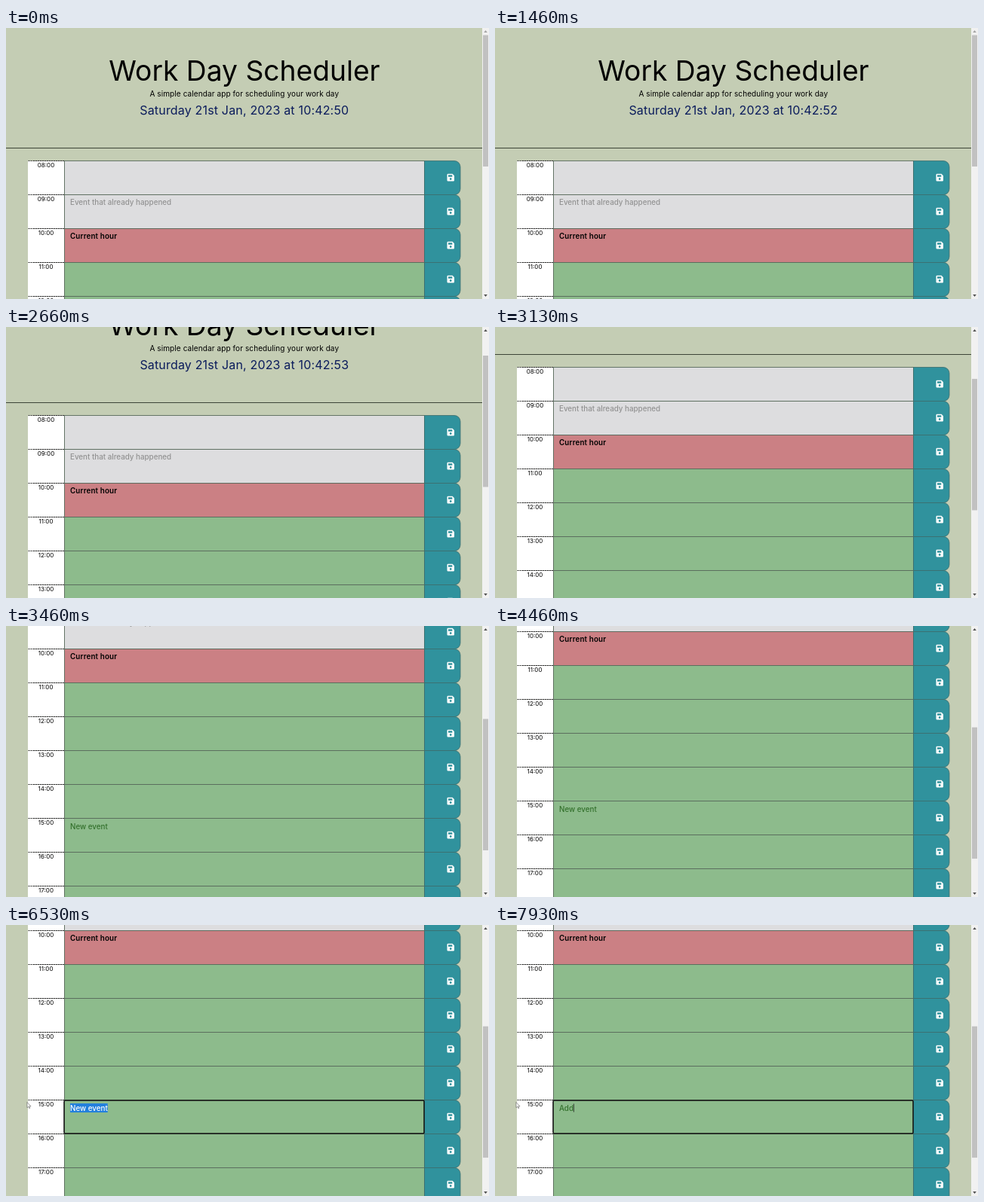
Animation, 640 px wide and 360 px high, one loop 8 s. Source, as an HTML page:

```html
<!DOCTYPE html>
<html lang="en">
<head>
<meta charset="utf-8">
<title>Work Day Scheduler</title>
<style>
html, body { margin: 0; width: 100%; height: 100%; overflow: hidden; background: #c4cdb4; }
svg { display: block; width: 100%; height: 100%; font-family: Inter, sans-serif; font-optical-sizing: none; }
.mid { text-anchor: middle; }
.note { font-size: 9.8px; font-weight: 500; }
.now { font-weight: 600; letter-spacing: .15px; }
.past { fill: #dddddf; }
.present { fill: #cb8084; }
.future { fill: #8dbb8c; }
</style>
</head>
<body>
<svg id="stage" viewBox="0 0 640 360">
  <rect width="640" height="360" fill="#c4cdb4"/>
  <g id="page">
    <text class="mid" x="316" y="69.5" font-size="37.2">Work Day Scheduler</text>
    <text class="mid" x="315.8" y="90.5" font-size="10" letter-spacing=".1">A simple calendar app for scheduling your work day</text>
    <text class="mid" id="clock" x="315.8" y="114.5" font-size="16" letter-spacing=".17" fill="#0b1c5c"></text>
    <path d="M0 159.5H631" stroke="#3d4437"/>
    <g id="rows"></g>
    <rect id="mark" y="496" height="12" fill="#2380dc"/>
    <text id="event" class="note" x="85" y="505.5"><tspan id="plain" fill="#33702c"></tspan><tspan id="picked" fill="#fff"></tspan></text>
    <path id="caret" stroke="#222" stroke-width=".8"/>
    <rect id="focus" x="77" y="492" width="477" height="44" rx="1.5" fill="none" stroke="#111" stroke-width="1.5"/>
  </g>
  <rect x="631" width="9" height="360" fill="#f1f1f1"/>
  <rect id="thumb" x="632" width="7" height="174.5" fill="#c1c1c1"/>
  <path id="up" d="M633.2 6L635.5 3L637.8 6Z"/>
  <path d="M633.2 354L635.5 357L637.8 354Z" fill="#505050"/>
  <path id="arrow" d="M0 0V7.2L1.7 5.7L2.8 8.1L3.9 7.6L2.8 5.3H5Z" fill="#fff" stroke="#555" stroke-width=".6"/>
</svg>
<script>
const LOOP = 8000;
const TOP = 176.5, PITCH = 45;
const SCROLL = [[2180, 0], [2460, 34], [2730, 67], [2900, 67], [3130, 123], [3460, 236], [3600, 253], [3730, 259]];
const TICKS = [450, 1450, 2490, 3450];
const FOCUS = 5640;
const DRAG = [5800, 6400];
const TYPED = [[7460, "A"], [7800, "Ad"], [7930, "Add"]];
const NOTES = { 9: ["Event that already happened", "#929292"], 10: ["Current hour", "#000"] };
const $ = id => document.getElementById(id);

function row(hour) {
  const y = TOP + (hour - 8) * PITCH;
  const kind = hour < 10 ? "past" : hour === 10 ? "present" : "future";
  const [text, color] = NOTES[hour] || ["", "#000"];
  const label = String(hour).padStart(2, "0") + ":00";
  return `<g transform="translate(0 ${y})">
    <rect x="29" width="48" height="45" fill="#fff"/>
    <path d="M29.5 0H77M36 0H77" stroke="#333" stroke-dasharray="2 1"/>
    <text class="mid" x="53" y="8" font-size="8">${label}</text>
    <rect class="${kind}" x="77.5" width="477" height="45" stroke="#596a5c" stroke-width=".9"/>
    <path d="M554.5 0H594a8 8 0 0 1 8 8V37a8 8 0 0 1 -8 8H554.5Z" fill="#30929d" stroke="#3c6c6c" stroke-width=".8"/>
    <path fill="#fff" fill-rule="evenodd" d="M585.7 17.3H591.6L594 19.7V25.8a1.2 1.2 0 0 1 -1.2 1.2H585.7a1.2 1.2 0 0 1 -1.2 -1.2V18.5a1.2 1.2 0 0 1 1.2 -1.2ZM586 18.7V21.3H591.3V18.7ZM589.2 22.6a1.4 1.4 0 1 0 .01 0Z"/>
    <text class="note ${hour === 10 ? "now" : ""}" x="85" y="13.8" fill="${color}">${text}</text>
  </g>`;
}

function track(keys, t) {
  if (t <= keys[0][0]) return keys[0][1];
  for (let i = 1; i < keys.length; i++) {
    const [a, from] = keys[i - 1], [b, to] = keys[i];
    if (t < b) return from + (to - from) * (t - a) / (b - a);
  }
  return keys[keys.length - 1][1];
}

const show = (id, on) => $(id).setAttribute("visibility", on ? "visible" : "hidden");

function drawEvent(t) {
  const typed = TYPED.filter(([at]) => t >= at).pop();
  const text = typed ? typed[1] : "New event";
  const drag = Math.min(1, Math.max(0, (t - DRAG[0]) / (DRAG[1] - DRAG[0])));
  const cut = typed ? text.length : Math.round(text.length * (1 - Math.min(1, drag * 1.6)));
  $("plain").textContent = text.slice(0, cut);
  $("picked").textContent = text.slice(cut);

  const left = 85 + $("plain").getComputedTextLength();
  $("mark").setAttribute("x", left);
  $("mark").setAttribute("width", $("picked").getComputedTextLength());
  $("caret").setAttribute("d", `M${left + .4} 496.5v11`);
  show("mark", cut < text.length);
  show("caret", t >= FOCUS && cut === text.length);
  show("focus", t >= FOCUS);
}

function draw(t) {
  const scroll = Math.round(track(SCROLL, t));
  $("page").setAttribute("transform", `translate(0 ${-scroll})`);
  $("thumb").setAttribute("y", 9.5 + scroll * .483);
  $("up").setAttribute("fill", scroll ? "#505050" : "#a3a3a3");

  const seconds = 50 + TICKS.filter(at => t >= at).length;
  $("clock").textContent = `Saturday 21st Jan, 2023 at 10:42:${seconds}`;
  drawEvent(t);

  // The pointer is an arrow only outside the text fields.
  const atEdge = t >= DRAG[1];
  $("arrow").setAttribute("transform", atEdge ? "translate(28 235.5)" : "translate(405 119.5)");
  show("arrow", atEdge || (t >= 2200 && TOP - scroll > 123));
}

$("rows").innerHTML = Array.from({ length: 10 }, (_, i) => row(8 + i)).join("");

const start = performance.now();
function frame() {
  draw((performance.now() - start) % LOOP);
  requestAnimationFrame(frame);
}
draw(0);
requestAnimationFrame(frame);
</script>
</body>
</html>
```
